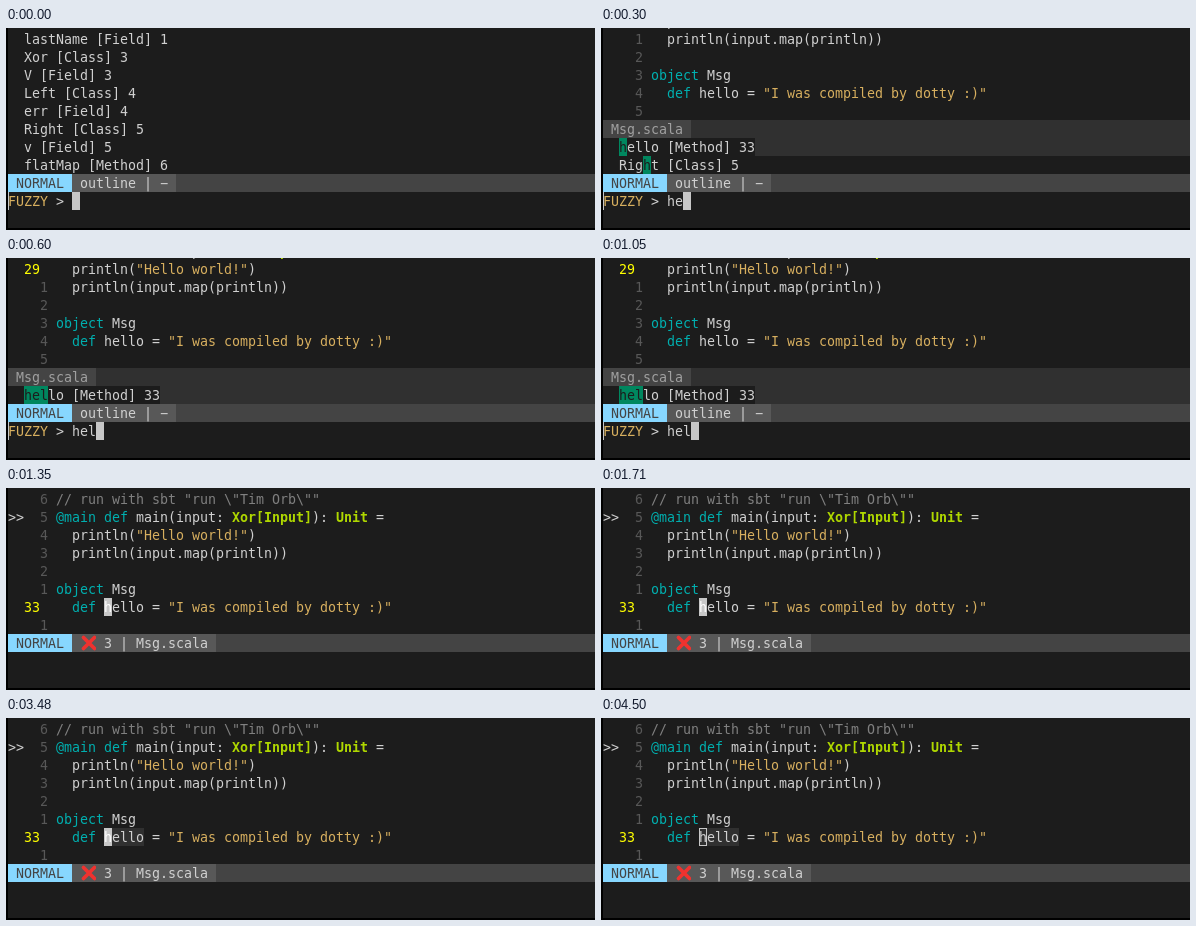
Write an HTML page that moves like this. It is 589 by 202 pixels and loops after 4600 ms.

```html
<!DOCTYPE html>
<html lang="en">
<head>
<meta charset="utf-8">
<title>Fuzzy outline</title>
<style>
  html, body { margin: 0; width: 100%; height: 100%; overflow: hidden; background: #000; }
  #screen { position: absolute; left: 2px; top: 0; width: 587px; height: 200px; overflow: hidden; background: #1c1c1c; }
  .scene { position: absolute; inset: 0; }
  .row { position: absolute; left: 0; width: 100%; height: 18px; display: flex; }
  .row span {
    flex: none; height: 18px; white-space: pre; color: #d0d0d0;
    font: 13.3px/19px "DejaVu Sans Mono", monospace;
    letter-spacing: calc(8px - 1ch); /* 8px terminal cells */
  }
  .row svg { flex: none; overflow: visible; }
  .row.bar { background: #444; }
  .row.dim { background: #303030; }
  .row .number { color: #585858; }
  .row .current { color: #ff0; }
  .row .comment { color: #808080; }
  .row .keyword { color: #00afaf; }
  .row .string { color: #d7af5f; }
  .row .type { color: #afd700; font-weight: bold; }
  .row .mode { color: #444; background: #87d7ff; }
  .row .info { background: #585858; }
  .row .file { color: #a0a0a0; background: #444; }
  .row .plain { background: #1c1c1c; }
  .row .match { color: #1c1c1c; background: #00875f; }
  .row .word { background: #303030; }
  .row .block { color: #fff; background: #c7c7c7; }
  .row .hollow { background: #303030; box-shadow: inset 0 0 0 1px #c7c7c7; }
  .row .prompt { color: #d7af5f; box-shadow: inset 1px 0 #c7c7c7; }
</style>
</head>
<body>
<div id="screen"></div>
<script>
const ROW = 18, TOP = 2, LOOP = 4600;

const escape = s => s.replace(/&/g, "&amp;").replace(/</g, "&lt;").replace(/>/g, "&gt;");
const span = (cls, text) => `<span class="${cls}">${escape(text)}</span>`;
const text = s => span("", s);
const plain = s => span("plain", s);
const match = s => span("match", s);
const keyword = s => span("keyword", s);
const string = s => span("string", s);
const type = s => span("type", s);
const row = (index, html, cls = "") =>
  `<div class="row ${cls}" style="top:${TOP + ROW * index}px">${html}</div>`;

const cross = `<svg width="16" height="18"><path d="M3.5 3.5L14.5 14.5M14.5 3.5L3.5 14.5"
  stroke="#f0322f" stroke-width="3.8" stroke-linecap="round"/></svg>`;
const hello = text("hello");

const code = word => [
  span("comment", '// run with sbt "run \\"Tim Orb\\""'),
  keyword("@main def") + text(" main(input: ") + type("Xor[Input]") + text("): ") + type("Unit") + text(" ="),
  text("  println(") + string('"Hello world!"') + text(")"),
  text("  println(input.map(println))"),
  "",
  keyword("object") + text(" Msg"),
  text("  ") + keyword("def") + text(" ") + word + text(" = ") + string('"I was compiled by dotty :)"'),
  ""
];

// Lines of the file with numbers relative to the current one.
function editor(firstRow, lastRow, firstLine, current, number, word = hello) {
  const lines = code(word);
  let html = "";
  for (let r = firstRow; r <= lastRow; r++) {
    const i = firstLine + r - firstRow;
    const sign = i === 1 ? ">>" : "  ";
    const label = i === current
      ? span("current", number + "  ")
      : span("number", `  ${Math.abs(i - current)} `);
    html += row(r, text(sign) + label + lines[i]);
  }
  return html;
}

const outlineBar = row(8, span("mode", " NORMAL ") + span("info", " outline | \u2212 "), "bar");
const fileBar = row(8, span("mode", " NORMAL ") + span("info", " ") +
  `<span class="info">${cross}</span>` + span("info", " 3 | Msg.scala "), "bar");
const inactiveBar = r => row(r, span("file", " Msg.scala "), "dim");
const fuzzy = query => outlineBar +
  row(9, span("prompt", "FUZZY") + text(" > " + query) + span("block", " "));

const symbols = ["lastName [Field] 1", "Xor [Class] 3", "V [Field] 3", "Left [Class] 4",
  "err [Field] 4", "Right [Class] 5", "v [Field] 5", "flatMap [Method] 6"];

const list = symbols.map((s, i) => row(i, text("  " + s))).join("") + fuzzy("");

const helloHit = (r, matched) => row(r, plain("  ") + match("hello".slice(0, matched)) +
  plain("hello".slice(matched) + " [Method] 33"), "dim");

const twoHits = editor(-1, 4, 2, 2, 29) + inactiveBar(5) + helloHit(6, 1) +
  row(7, text("  Rig") + match("h") + text("t [Class] 5")) + fuzzy("he");

const oneHit = matched => editor(-1, 5, 1, 2, 29) + inactiveBar(6) +
  helloHit(7, matched) + fuzzy("hel");

const jumped = (cursor, rest) =>
  editor(0, 7, 0, 6, 33, span(cursor, "h") + span(rest, "ello")) + fileBar;

const scenes = [
  [300, list],
  [150, twoHits],
  [150, oneHit(2)],
  [750, oneHit(3)],
  [600, jumped("block", "")],
  [2550, jumped("block", "word")],
  [100, jumped("hollow", "word")]
];

let start = 0;
for (const [duration, html] of scenes) {
  const layer = document.createElement("div");
  layer.className = "scene";
  layer.innerHTML = html;
  document.getElementById("screen").append(layer);
  const end = start + duration;
  const step = (time, opacity) => ({ offset: time / LOOP, opacity, easing: "step-end" });
  const steps = [step(start, 1), step(end, 0)];
  if (start > 0) steps.unshift(step(0, 0));
  if (end < LOOP) steps.push(step(LOOP, 0));
  layer.animate(steps, { duration: LOOP, iterations: Infinity });
  start = end;
}
</script>
</body>
</html>
```
